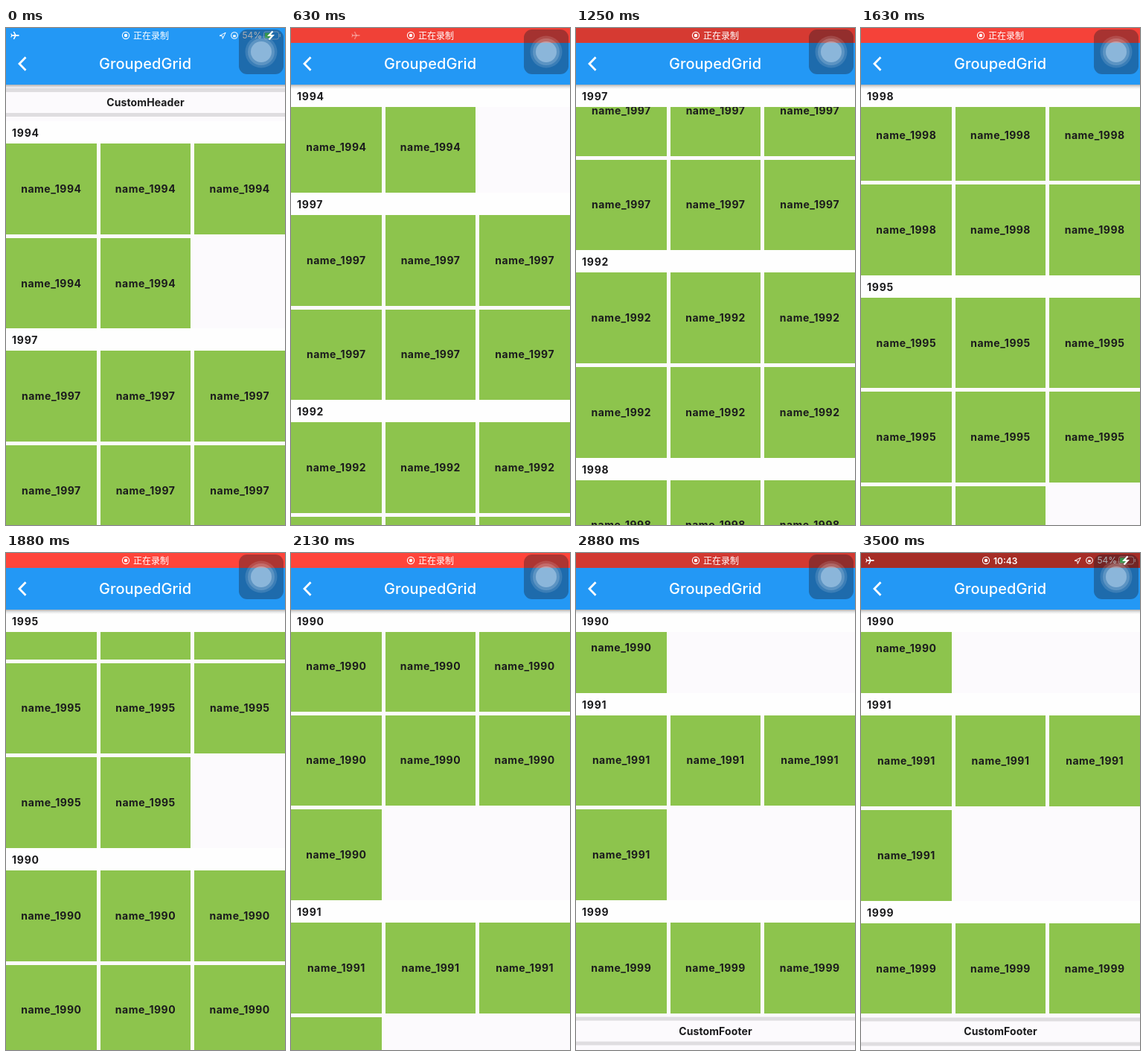
An HTML page with a canvas that plays this animation: 375 by 667 pixels, repeating every 3620 ms.

```html
<!DOCTYPE html>
<html lang="zh">
<head>
<meta charset="utf-8">
<style>
  html, body { margin: 0; width: 100%; height: 100%; overflow: hidden; background: #fcfafd; }
  canvas { display: block; width: 375px; height: 667px; }
</style>
</head>
<body>
<canvas id="stage" width="375" height="667"></canvas>
<script>
const ctx = document.getElementById('stage').getContext('2d');
const W = 375, H = 667, LOOP = 3620, STEP = 125;
const TOP = 76, HEAD = 30, GAP = 5, CELL = (W - 2 * GAP) / 3;
const BLUE = [35, 152, 245], RED = [255, 69, 59];
const GREEN = '#8dc44d', PAGE = '#fcfafd', INK = '#1b1b1d', DIM = 'rgba(255,255,255,.55)';
const SANS = 'Inter, Roboto, sans-serif';
const CJK = '"Noto Sans CJK SC", "Noto Sans CJK", sans-serif';

// year and number of items in each section
const groups = [
  [1994, 5], [1997, 6], [1992, 6], [1998, 6],
  [1995, 8], [1990, 7], [1991, 4], [1999, 3]
].map(([year, count]) => ({ year, count }));

let end = 125;
for (const g of groups) {
  const rows = Math.ceil(g.count / 3);
  g.y = end;
  g.end = end += HEAD + rows * (CELL + GAP) - GAP;
}
const MAX_SCROLL = end + 48.5 - H;

const ramp = (k, a, b) => Math.min(1, Math.max(0, (k - a) / (b - a)));
const mix = (a, b, p) => a + (b - a) * p;
const rgb = c => `rgb(${c.map(Math.round)})`;

// slow drag, fast fling, then a bounce settling at the end of the list
function scrollAt(k) {
  const drag = n => n * (34.65 + 0.37 * n);
  if (k <= 10) return drag(k);
  const n = k - 10;
  if (k <= 18) return drag(10) + n * (176.64 - 0.768 * n);
  return MAX_SCROLL + 14.6 * 0.4 ** (k - 20);
}

// the recording bar turns red, then its brightness pulses
function barColor(k) {
  const light = 0.94 - 0.1 * ramp(k, 5, 10) + 0.16 * ramp(k, 10, 14) - 0.35 * ramp(k, 18, 28);
  return rgb(BLUE.map((c, i) => mix(c, RED[i] * light, ramp(k, 1, 4))));
}

function rect(x, y, w, h, color) {
  ctx.fillStyle = color;
  ctx.fillRect(x, y, w, h);
}

function panel(x, y, w, h, r, color, line) {
  ctx.beginPath();
  ctx.roundRect(x, y, w, h, r);
  ctx.lineWidth = 1;
  ctx[line ? 'strokeStyle' : 'fillStyle'] = color;
  line ? ctx.stroke() : ctx.fill();
}

function disc(x, y, r, color) {
  ctx.fillStyle = color;
  ctx.beginPath();
  ctx.arc(x, y, r, 0, 7);
  ctx.fill();
}

function ring(x, r) {
  ctx.lineWidth = 1.1;
  ctx.strokeStyle = '#fff';
  ctx.beginPath();
  ctx.arc(x, 10, r, 0, 7);
  ctx.stroke();
}

function stroke(points, width) {
  ctx.beginPath();
  points.forEach(p => ctx.lineTo(...p));
  ctx.lineWidth = width;
  ctx.strokeStyle = '#fff';
  ctx.stroke();
}

function text(str, x, y, font, color, align = 'center', spacing = 0) {
  ctx.font = font;
  ctx.letterSpacing = spacing + 'px';
  ctx.textAlign = align;
  ctx.fillStyle = color;
  ctx.fillText(str, x, y);
}

const label = (str, x, y, align, spacing = 0.5) =>
  text(str, x, y, `700 14px ${SANS}`, INK, align, spacing);

function banner(str, y) {
  rect(0, y, W, 5, '#dfdde0');
  rect(0, y + 33, W, 5, '#dfdde0');
  label(str, W / 2, y + 24, 'center', 0.1);
}

function cell(x, y, str) {
  const left = Math.round(x), top = Math.round(y);
  rect(left, top, Math.round(x + CELL) - left, Math.round(y + CELL) - top, GREEN);
  label(str, x + CELL / 2, y + CELL / 2 + 5);
}

function drawList(scroll) {
  rect(0, 0, W, H, PAGE);
  banner('CustomHeader', 81 - scroll);
  banner('CustomFooter', end + 5 - scroll);
  for (const g of groups) {
    const y0 = g.y - scroll, y1 = g.end - scroll;
    if (y1 < TOP || y0 > H) continue;
    for (let i = 0; i < g.count; i++) {
      const row = Math.floor(i / 3);
      cell((i % 3) * (CELL + GAP), y0 + HEAD + row * (CELL + GAP), 'name_' + g.year);
    }
    const hy = Math.max(y0, Math.min(TOP, y1 - HEAD));
    rect(0, Math.round(hy), W, HEAD, '#fefefe');
    label(String(g.year), 8, hy + 21, 'left', 0.8);
  }
}

function plane(x, alpha) {
  ctx.save();
  ctx.globalAlpha = alpha;
  ctx.translate(x, 10);
  stroke([[-5, 0], [5.5, 0]], 1.8);
  stroke([[-1.6, -5], [1, 0], [-1.6, 5]], 1.6);
  stroke([[-5.3, -2.4], [-4, 0], [-5.3, 2.4]], 1.1);
  ctx.restore();
}

function recording(str, x, font, alpha) {
  ctx.globalAlpha = alpha;
  ring(x, 4.6);
  disc(x, 10, 2.2, '#fff');
  text(str, x + 10, 14.5, font, '#fff', 'left');
  ctx.globalAlpha = 1;
}

function deviceIcons(alpha) {
  ctx.globalAlpha = alpha;
  stroke([[287, 10.4], [295.2, 6.2], [291.2, 14.4], [290.9, 10.6], [287, 10.4]], 1);
  ring(307, 4.3);
  rect(305.2, 9.4, 3.6, 2.8, '#fff');
  text('54%', 317.5, 14.4, `400 12px ${SANS}`, '#fff', 'left');
  panel(346.5, 5, 20, 10, 2.5, DIM, true);
  rect(348, 6.5, 9, 7, '#4cd964');
  rect(367.6, 8, 1.4, 4, DIM);
  ctx.globalAlpha = 1;
}

function drawAppBar() {
  const shade = ctx.createLinearGradient(0, TOP, 0, TOP + 6);
  shade.addColorStop(0, 'rgba(0,0,0,.3)');
  shade.addColorStop(0.5, 'rgba(0,0,0,.1)');
  shade.addColorStop(1, 'rgba(0,0,0,0)');
  rect(0, TOP, W, 6, shade);
  rect(0, 0, W, TOP, rgb(BLUE));
  stroke([[26.5, 39.3], [18, 48], [26.5, 56.7]], 2.8);
  text('GroupedGrid', 187, 55, `500 20px ${SANS}`, '#fff', 'center', 0.1);
}

function drawStatus(k, shown, icons) {
  const clock = ramp(k, 25, 27);
  rect(0, 0, W, 20, barColor(k));
  recording('正在录制', 161, `400 12px ${CJK}`, 1 - clock);
  recording('10:43', 168, `600 12px ${SANS}`, clock);
  plane(mix(112, 12, shown), Math.min(1, shown * 1.4));
  deviceIcons(icons);
}

function drawTouch(icons) {
  panel(313, 2, 60, 60, 11, 'rgba(20,25,35,.35)');
  disc(343, 32, 21.5, 'rgba(255,255,255,.13)');
  disc(343, 32, 18, 'rgba(255,255,255,.17)');
  disc(343, 32, 14, 'rgba(205,228,250,.42)');
  ctx.globalAlpha = icons;
  stroke([[358.5, 4.5], [353.5, 10], [358.5, 10], [353.5, 15.5]], 2.2);
  ctx.globalAlpha = 1;
}

function frame() {
  const t = performance.now() % LOOP;
  // eight pictures a second, on a 10 ms clock
  let k = Math.min(28, Math.floor(t / STEP));
  if (t < Math.round(k * STEP / 10) * 10) k--;
  const shown = 1 - ramp(k, 2, 6) + ramp(k, 25, 28);
  const icons = ramp(shown, 0.25, 1);
  drawList(scrollAt(k));
  drawAppBar();
  drawStatus(k, shown, icons);
  drawTouch(icons);
  requestAnimationFrame(frame);
}
requestAnimationFrame(frame);
</script>
</body>
</html>
```
